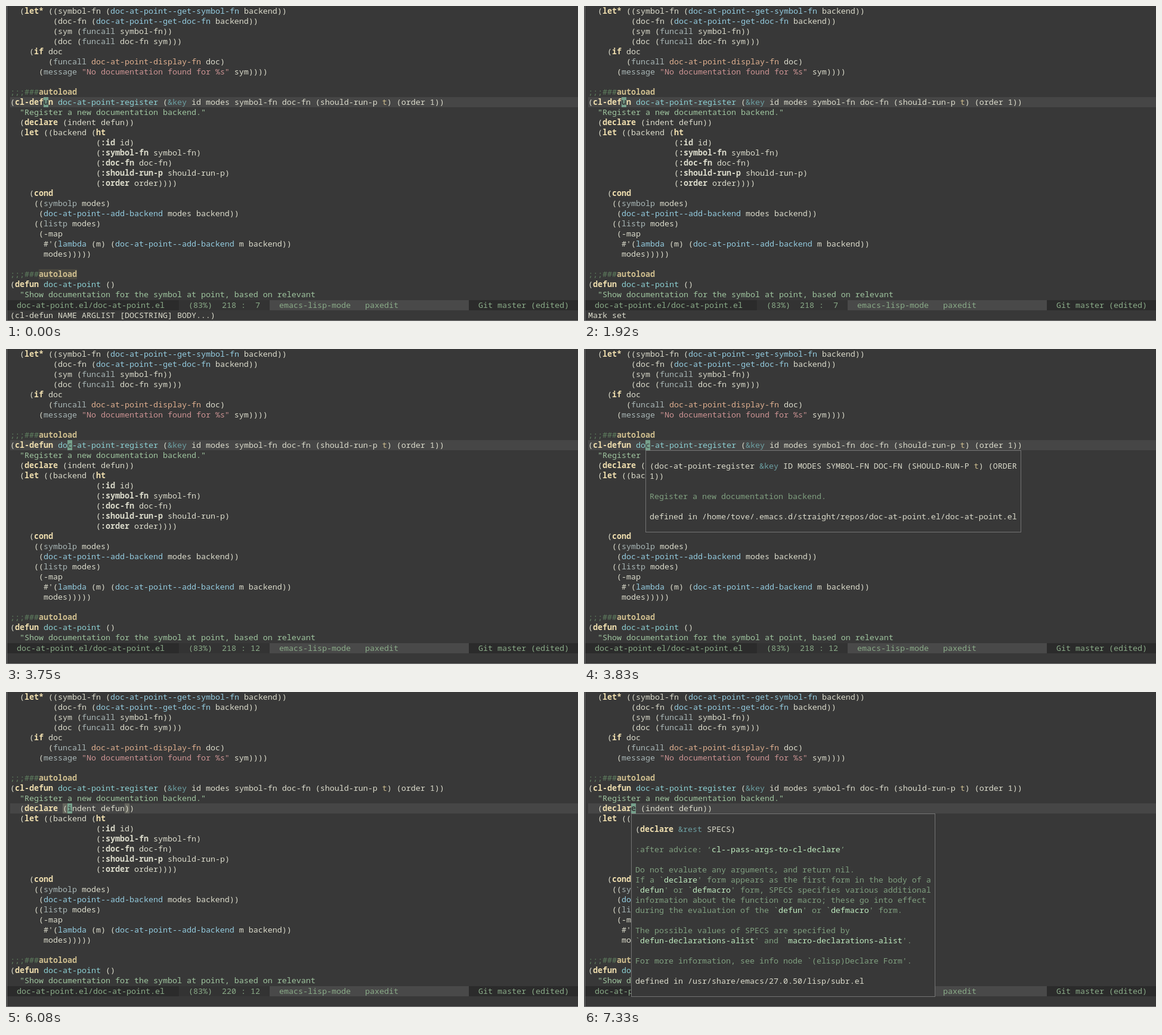
These frames come from a looping animation (959x529 px, 8 s). An HTML page:

```html
<!DOCTYPE html>
<html lang="en">
<head>
<meta charset="utf-8">
<title>Editor documentation popup</title>
<style>
  html, body { margin: 0; width: 100%; height: 100%; overflow: hidden; background: #383838; }
  #stage {
    position: relative; width: 959px; height: 529px; overflow: hidden;
    background: #383838; color: #dcdccc;
    font: calc(40px / 3)/17px "Noto Sans Mono", "Liberation Mono", monospace;
    font-variant-ligatures: none; white-space: pre;
  }
  #stage div { position: absolute; height: 17px; }
  #stage .edge { background: #7b7b7b; }
  #line { left: 7px; width: 952px; background: #464646; }
  #cursor { width: 8px; background: #76a08c; color: #383838; }
  .match { width: 8px; background: #66665e; }
  #glow { left: 55px; top: 442px; width: 64px; background: #4a4840; }
  .bar { top: 494px; color: #8aab88; }
  #stage .popup { background: #383838; border: 1px solid #747474; box-sizing: border-box; }
  .k { color: #f0dfaf; font-weight: 700; }
  .b { font-weight: 700; }
  .f { color: #94cce0; }
  .d { color: #8cd0d3; }
  .g { color: #a9b7b7; }
  .a { color: #6ca0a3; }
  .v { color: #dfaf8f; }
  .t { color: #d0bf8f; }
  .s { color: #cc9393; }
  .q { color: #9fc59f; }
  .c { color: #7f9f7f; }
  .e { color: #5f7f5f; }
  .l { color: #d0bf8f; font-weight: 700; }
  .n { color: #bfebbf; }
</style>
</head>
<body>
<div id="stage"></div>
<script>
const X = 7, CELL = 8, ROW = 17, LOOP = 8000;
const stage = document.getElementById('stage');

// {x text} wraps text in a span of class x
const markup = s => s.replace(/&/g, '&amp;')
  .replace(/\{(\w) ([^}]*)\}/g, '<span class="$1">$2</span>');

function box(x, y, html = '', props = {}, parent = stage) {
  const el = document.createElement('div');
  Object.assign(el, props);
  el.style.left = x + 'px';
  el.style.top = y + 'px';
  el.innerHTML = markup(html);
  return parent.appendChild(el);
}

function block(x, y, w, h, color, className = '') {
  const el = box(x, y, '', { className });
  el.style.cssText += `width:${w}px;height:${h}px;background:${color}`;
  return el;
}

const pad = n => ' '.repeat(n);
const code = [
  '  ({k let*} ((symbol-fn ({f doc-at-point--get-symbol-fn} backend))',
  pad(9) + '(doc-fn ({f doc-at-point--get-doc-fn} backend))',
  pad(9) + '(sym ({g funcall} symbol-fn))',
  pad(9) + '(doc ({g funcall} doc-fn sym)))',
  '    ({k if} doc',
  pad(8) + '({g funcall} {v doc-at-point-display-fn} doc)',
  pad(6) + '({g message} {s "No documentation found for %s"} sym))))',
  '',
  '{e ;;;###}{l autoload}',
  '({k cl-defun} {d doc-at-point-register} ({a &key} id modes symbol-fn doc-fn (should-run-p {t t}) (order 1))',
  '  {q "Register a new documentation backend."}',
  '  ({k declare} (indent defun))',
  '  ({k let} ((backend ({k ht}',
  pad(18) + '({b :id} id)',
  pad(18) + '({b :symbol-fn} symbol-fn)',
  pad(18) + '({b :doc-fn} doc-fn)',
  pad(18) + '({b :should-run-p} should-run-p)',
  pad(18) + '({b :order} order))))',
  '    ({k cond}',
  '     (({g symbolp} modes)',
  '      ({f doc-at-point--add-backend} modes backend))',
  '     (({g listp} modes)',
  '      (-map',
  "       #'({f lambda} (m) ({f doc-at-point--add-backend} m backend))",
  '       modes)))))',
  '',
  '{e ;;;###}{l autoload}',
  '({k defun} {d doc-at-point} ()',
  '  {q "Show documentation for the symbol at point, based on relevant}'
];

const registerDoc = [
  '',
  '(doc-at-point-register {a &key} ID MODES SYMBOL-FN DOC-FN (SHOULD-RUN-P {t t}) (ORDER',
  '1))',
  '',
  '{c Register a new documentation backend.}',
  '',
  'defined in /home/tove/.emacs.d/straight/repos/doc-at-point.el/doc-at-point.el'
];

const declareDoc = [
  '',
  '({k declare} {a &rest} SPECS)',
  '',
  '{c :after advice: ‘}{n cl--pass-args-to-cl-declare}{c ’}',
  '',
  '{c Do not evaluate any arguments, and return nil.}',
  '{c If a `}{n declare}{c \' form appears as the first form in the body of a}',
  '{c `}{n defun}{c \' or `}{n defmacro}{c \' form, SPECS specifies various additional}',
  '{c information about the function or macro; these go into effect}',
  '{c during the evaluation of the `}{n defun}{c \' or `}{n defmacro}{c \' form.}',
  '',
  '{c The possible values of SPECS are specified by}',
  '{c `}{n defun-declarations-alist}{c \' and `}{n macro-declarations-alist}{c \'.}',
  '',
  '{c For more information, see info node `(elisp)Declare Form\'.}',
  '',
  'defined in /usr/share/emacs/27.0.50/lisp/subr.el'
];

function popup(x, y, w, h, lines) {
  const el = block(x, y, w, h, '#383838', 'popup');
  lines.forEach((s, i) => box(6, i * ROW, s, {}, el));
  return el;
}

const line = box(X, 0, '', { id: 'line' });
const glow = box(55, 442, '', { id: 'glow' });
const matches = [11, 24].map(c => box(X + c * CELL, 11 * ROW, '', { className: 'match' }));
const rows = code.map((s, i) => box(X, i * ROW, s));
const cursor = box(0, 0, '', { id: 'cursor' });

block(2, 494, 288, ROW, '#2b2b2b');
block(290, 494, 152, ROW, '#333333');
block(442, 494, 334, ROW, '#494949');
block(776, 494, 183, ROW, '#2b2b2b');
const bar = (x, s) => box(x, 494, s, { className: 'bar' });
bar(18, 'doc-at-point.el/doc-at-point.el');
bar(306, '(83%)');
const place = bar(362, '');
bar(458, 'emacs-lisp-mode');
bar(602, 'paxedit');
bar(792, 'Git master (edited)');
const mini = box(X, 511);

block(1, 0, 1, 529, '', 'edge').style.background = '';
block(0, 528, 959, 1, '', 'edge').style.background = '';

const popups = [
  popup(103, 170, 630, 138, registerDoc),
  popup(79, 204, 510, 308, declareDoc)
];

const hint = '(cl-defun NAME ARGLIST [DOCSTRING] BODY...)';
const nameHint = hint.replace('NAME', '{b NAME}');

// time, row, column, echo area, popup, matched parens
const steps = [
  [0, 9, 7, hint],
  [1920, 9, 7, 'Mark set'],
  [2000, 9, 7, ''],
  [2920, 9, 8, hint],
  [3080, 9, 9, hint],
  [3170, 9, 10, nameHint],
  [3330, 9, 12, nameHint],
  [3750, 9, 12, ''],
  [3830, 9, 12, '', 0],
  [5000, 9, 13, nameHint],
  [5080, 10, 13, ''],
  [5420, 11, 13, ''],
  [6080, 11, 12, '', -1, true],
  [6420, 11, 11, '(declare &rest {b SPECS})', -1, true],
  [6580, 11, 10, '(declare &rest SPECS)'],
  [6750, 11, 9, '(declare &rest SPECS)'],
  [7170, 11, 9, ''],
  [7330, 11, 9, '', 1]
];

const show = (el, on) => { el.style.visibility = on ? 'visible' : 'hidden'; };
let current;

function apply(step) {
  const [, row, col, echo, open = -1, paired = false] = step;
  line.style.top = cursor.style.top = row * ROW + 'px';
  cursor.style.left = X + col * CELL + 'px';
  cursor.textContent = rows[row].textContent[col];
  cursor.style.fontWeight = row === 9 && col < 9 || row === 11 && col < 10 ? 700 : 400;
  place.textContent = `${row + 209} : ${String(col).padStart(2)}`;
  mini.innerHTML = markup(echo);
  popups.forEach((el, i) => show(el, i === open));
  matches.forEach(el => show(el, paired));
}

const start = performance.now();
function tick() {
  const t = (performance.now() - start) % LOOP;
  const step = steps.findLast(s => s[0] <= t);
  if (step !== current) apply(current = step);
  show(glow, t < 420);
  requestAnimationFrame(tick);
}
tick();
</script>
</body>
</html>
```
